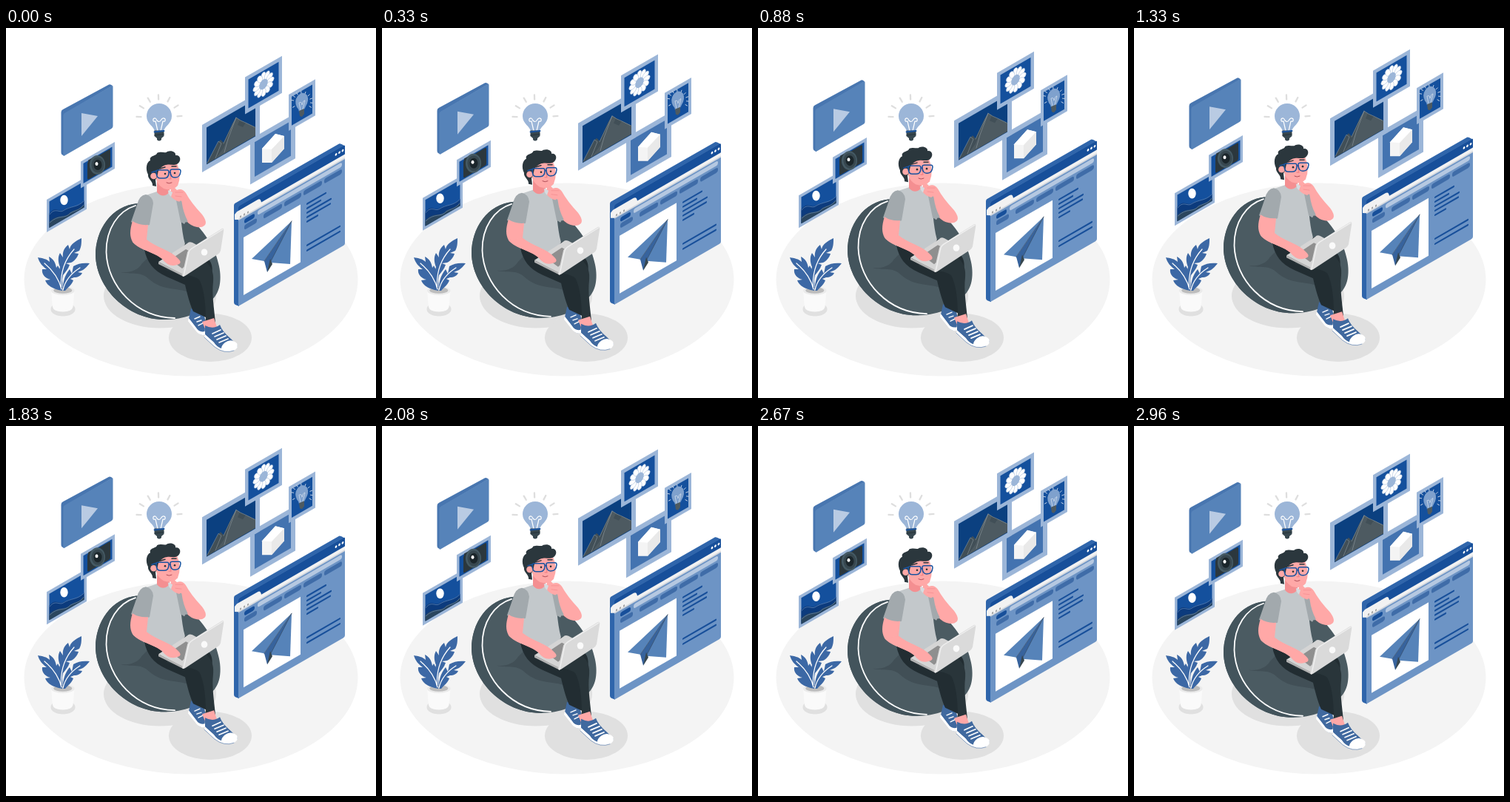
Animation of 500x500 px, one loop 3 s. Source, as an HTML page:

```html
<!DOCTYPE html>
<html lang="en">
<head>
<meta charset="utf-8">
<title>Floating workspace</title>
<style>
html, body { margin: 0; width: 100%; height: 100%; overflow: hidden; background: #fff; }
svg { display: block; width: 100vw; height: 100vh; }
</style>
</head>
<body>
<svg viewBox="0 0 500 500" fill="none" stroke-linecap="round" stroke-linejoin="round">
  <ellipse cx="250" cy="340" rx="225.500" ry="130.500" fill="#f4f4f4"/>
  <g fill="#e0e0e0">
    <ellipse cx="208" cy="362" rx="76" ry="43.500"/>
    <ellipse cx="276" cy="418.500" rx="56" ry="32.500"/>
    <ellipse cx="77" cy="380" rx="16.500" ry="9.500"/>
  </g>

  <g id="plant">
    <path d="M61 355L63 377Q64 383 77 383.500Q89 383 90.500 377L92.500 355Z" fill="#fafafa"/>
    <ellipse cx="76.800" cy="355" rx="15.800" ry="6" fill="#ebebeb"/>
    <ellipse cx="76.800" cy="354.500" rx="12.500" ry="4.300" fill="#bdbdbd"/>
    <g fill="#3c68a5">
      <path d="M74 350C71 342 70 332 73 323C70 316 70 309 73 304L77 310C76 302 79 297 84 293L86 299C87 292 94 288 102 284C102 290 102 296 99 301L92 304L98 305C96 311 92 315 88 317L81 318L86 320C84 326 80 330 77 334Z"/>
      <path d="M71 354C64 352 56 349 53 341L60 340C52 338 48 332 49 326L55 326C49 322 45 317 43 310C49 311 55 312 59 316L58 309C64 312 67 317 68 324L70 321C75 329 77 342 76 355Z"/>
      <path d="M77 355C76 346 79 334 86 326L89 332L91 322C97 318 105 317 113 318C110 322 107 325 104 327L97 330L103 331C101 335 97 337 92 337L87 339L91 341C89 347 84 350 80 355Z"/>
    </g>
    <path d="M74.500 350Q73 320 92 299M75 353Q70 333 52 318M77 354Q81 336 100 324" stroke="#fff" stroke-width="1.200"/>
  </g>

  <g id="idea">
    <g id="rays" stroke="#dedede" stroke-width="2.300"/>
    <path d="M201 140C200 132 190 130 190 119A17 17 0 0 1 224 119C224 130 214 132 213 140Z" fill="#9cb6d8"/>
    <path d="M205 139L202 126Q198 127 199 123Q202 120 204 125Q207 128 209 125Q212 120 215 123Q216 127 212 126L209 139" stroke="#fff" stroke-width="1.200"/>
    <path d="M200.500 138.500H213.500V146L210 149V151Q207 154 204 151V149L200.500 146Z" fill="#37474f"/>
    <path d="M200.500 140.500L213.500 139" stroke="#1a54a0" stroke-width="1.800"/>
    <path d="M201 145L213 143.500" stroke="#263238"/>
  </g>

  <g id="float">
    <g id="panels"></g>
    <g id="chair">
      <path d="M178 237C142 240 121 273 121 307C122 352 165 396 218 394C247 393 266 382 274 370C291 361 292 336 287 318C282 294 262 266 240 250Q215 238 178 237Z" fill="#4b5b62"/>
      <path d="M178 237C142 240 121 273 121 307C122 352 165 396 218 394C172 384 136 345 135 303C134 270 153 246 178 237Z" fill="#43545c"/>
      <path d="M175 240C152 247 135 271 135.500 303C137 349 176 391 228 392" stroke="#fff" stroke-width="1.800"/>
      <path d="M155 330C173 334 182 328 194 340C211 355 233 351 247 357L243 340L196 306L184 318C179 327 168 331 155 330Z" fill="#414f56"/>
    </g>

    <g id="person">
      <g id="backShoe">
        <path d="M250 379L266 381L270 398L268 414Q260 417 257 406L247 393Z" fill="#40699f"/>
        <path d="M247 392L246 396L258 411Q264 417 270 414L269 410Q261 412 257 405Z" fill="#fff"/>
        <path d="M255 393L262 390M258 397L264 395M260 402L266 399" stroke="#fff" stroke-width="1.400"/>
      </g>
      <path d="M187 299C190 316 199 328 217 336L242 347C245 360 249 375 253 383L270 391L278 334C281 318 275 310 262 306L235 286Z" fill="#222d32"/>
      <path d="M217 327C238 334 255 334 261 340C267 350 270 372 270 392L268 402L283 398C281 377 278 360 280 343C282 325 272 315 260 310L235 301Z" fill="#29353a"/>
      <path d="M265 397L281 392L286 407L270 409Z" fill="#ffa8a7"/>
      <g id="frontShoe">
        <path d="M269 402Q280 408 289 401Q292 410 304 420L313 429Q311 437 297 436Q286 434 280 424L269 415Z" fill="#40699f"/>
        <path d="M269 414L268 418L282 431Q295 441 308 436Q315 432 312 426Q304 419 296 425Q291 429 291 433Q285 431 281 425Z" fill="#fff"/>
        <path d="M279 413L290 408M282 417L294 412M285 421L297 416M288 425L300 420" stroke="#fff" stroke-width="1.700"/>
        <path d="M268 418L282 431Q295 441 308 436" stroke="#40699f" stroke-width=".6"/>
      </g>

      <path d="M189 226L204 221Q213 230 221 222L232 230C237 247 236 271 242 292Q234 305 220 305Q201 305 185 299C192 279 186 249 189 226Z" fill="#c3c8cb"/>
      <path d="M229 228L238 236L248 254L241 265L236 262Z" fill="#a2a9ad"/>
      <path d="M204 207L204 222Q212 231 221 222L221 213Z" fill="#f48f91"/>
      <path d="M189 225Q180 226 177 239L169 262Q181 270 194 266L199 237Q198 227 189 225Z" fill="#a2a9ad"/>
      <path d="M171 261C167 273 167 282 171 289C180 300 201 303 211 312Q221 324 230 320Q238 319 233 313C223 300 203 297 190 286L192 266Q180 267 171 261Z" fill="#ffa8a7"/>

      <g id="head">
        <path d="M203 185Q216 177 231 183Q238 198 232 213Q225 221 213 217Q205 212 203 205Z" fill="#ffa8a7"/>
        <path d="M198 213C199 207 191 204 192 198C188 190 190 181 195 179C193 172 204 173 204 169C211 166 215 170 218 167C224 165 230 168 229 172C236 171 238 180 231 184C225 187 218 181 209 189C204 192 206 201 202 205L203 214Z" fill="#2b373d"/>
        <circle cx="199.500" cy="200" r="4.300" fill="#ffa8a7"/>
        <path d="M208 190L215 188M224 187L230 187" stroke="#2b373d" stroke-width="1.500"/>
        <g fill="#263238"><circle cx="215" cy="197" r="1.300"/><circle cx="228" cy="196" r="1.300"/></g>
        <path d="M221 194L223 204L220 204" stroke="#f07f83" stroke-width="1.100"/>
        <path d="M217 209Q220 211 224 209" stroke="#b04e58" stroke-width="1"/>
        <path d="M203 194Q203 192 206 192L218 192Q220 192 220 195Q220 203 214 203L208 203Q203 203 203 194M222 193Q222 191 225 191L234 191Q236 191 236 194Q235 202 229 202Q222 203 222 193M220 195L222 195M197 195L203 193" stroke="#1a54a0" stroke-width="1.500"/>
      </g>
      <path d="M223 219Q220 224 224 229Q229 234 236 235Q238 250 243 260Q250 268 258 269Q265 270 268 267Q273 263 265 252Q250 236 243 223Q238 216 231 219L226 214Q221 214 223 219Z" fill="#ffa8a7"/>
      <path d="M236 235Q238 250 244 261" stroke="#a2a9ad" stroke-width="3"/>
      <path d="M219 219L225 222L223 228Q219 225 219 219Z" fill="#d6dce0"/>
      <path d="M229 222L239 222M229 227L237 228" stroke="#f48f91" stroke-width=".8"/>

      <g id="laptop">
        <path d="M206 316L245 291Q247 288 252 290L276 303L240 334Z" fill="#d5d5d5"/>
        <path d="M206 316L240 333V336L206 319Z" fill="#b3b3b3"/>
        <path d="M222 313L243 299L259 307L238 325Z" fill="#8f8f8f"/>
        <path d="M171 289C180 300 201 303 211 312Q220 324 231 320Q239 318 233 312C223 300 203 297 190 286Z" fill="#ffa8a7"/>
        <path d="M238 334L245 303Q246 300 249 298L292 271Q295 270 294 275L290 301Q289 304 286 306L242 335Q238 337 238 334Z" fill="#dadada"/>
        <path d="M240 335L247 303Q248 300 251 298L293 272" stroke="#f0f0f0" stroke-width="1.300"/>
        <ellipse cx="268" cy="303" rx="4.300" ry="4.600" fill="#fafafa"/>
      </g>
    </g>
  </g>
</svg>

<script>
const LOOP = 3000, LIFT = 10, SLOPE = -0.577;
const byId = id => document.getElementById(id);
const rect = (x, y, w, h, fill, r = 0) =>
  `<rect x="${x}" y="${y}" width="${w}" height="${h}" rx="${r}" fill="${fill}"/>`;
const shape = (d, fill) => `<path d="${d}" fill="${fill}"/>`;
const oval = (x, y, rx, ry, fill) =>
  `<ellipse cx="${x}" cy="${y}" rx="${rx}" ry="${ry}" fill="${fill}"/>`;
const line = (d, color, width = 1) =>
  `<path d="${d}" stroke="${color}" stroke-width="${width}"/>`;

// Places flat content on the isometric wall; (x, y) is its upper left corner.
const wall = (x, y, content) =>
  `<g transform="matrix(1 ${SLOPE} 0 1 ${x} ${y})">${content}</g>`;
const framed = (x, y, w, h, b, fill, content = '') =>
  wall(x, y, rect(0, 0, w, h, '#9cb6d8') + rect(b, b + 1, w - 2 * b, h - 2 * b - 2, fill) + content);

const spokes = (cx, cy, from, to, angles) => angles.map(deg => {
  const a = deg * Math.PI / 180, c = Math.cos(a), s = Math.sin(a);
  return `M${cx + from * c} ${cy + from * s}L${cx + to * c} ${cy + to * s}`;
}).join('');

function playPanel() {
  return shape('M74.500 114Q74.500 111 77 110L139 76.500Q141 75.500 144 78L79 116V173L75.500 171Q74.500 170 74.500 168Z', '#4876b0') +
    wall(77.5, 116, rect(0, 0, 67, 57.5, '#5683b9', 2)) +
    shape('M102 115L124 119L102 146Z', '#b9cbe3');
}

function cameraPanel() {
  return framed(101, 180.5, 46, 36, 3.5, '#14509d',
      rect(9, 6, 31, 24, '#2b373d', 2) + rect(10, 4, 8, 4, '#2b373d')) +
    oval(123.5, 185, 10.5, 13, '#455a64') + oval(124, 185, 8.5, 10.5, '#37474f') +
    oval(124, 185, 5.5, 7, '#1b262b') + oval(122.5, 183.5, 2, 2.5, '#fff');
}

function nightPanel() {
  return framed(55, 232, 54, 44, 3.5, '#14509d') + oval(78.5, 232.5, 5.2, 6.8, '#fff') +
    shape('M58.500 251C66 240 72 249 77 246C88 240 96 243 105.500 233V242.500L58.500 270Z', '#0c3b7d') +
    shape('M58.500 262C72 250 79 258 87 249C94 245 99 246 105.500 238V242.500L58.500 270Z', '#2b465e') +
    line('M59 252C66 242 72 250 77 247C88 240 96 243 105 234M59 263C72 251 79 259 87 250C94 246 99 247 105 239', '#7397c4', .6);
}

function mountainPanel() {
  return framed(265, 131, 78, 64, 6, '#0b4080') +
    shape('M271 184L286 155L290 151L294 155L306 129L311 121L316 124L324 128L337 134V145.500Z', '#414f57') +
    shape('M284 176L294 162L311 121L316 124L313 131L320 134L324 128L337 134V145.500Z', '#4d5a61') +
    line('M272 182L287 153L291 156L283 176M294 156L311 121L300 150L295 168M311 121L317 125L324 128L336 134', '#9aa4aa', .5);
}

function flowerPanel() {
  let petals = '';
  for (let i = 0; i < 12; i++) {
    petals += `<g transform="rotate(${i * 30})">${oval(0, -11, 3.7, 5.4, '#fff')}</g>`;
  }
  return framed(323, 66.5, 50, 50, 4.5, '#14509d') +
    `<g transform="matrix(.87 -.5 0 1 348 76)"><g stroke="#9cb6d8" stroke-width=".5">${petals}</g>${oval(0, 0, 6.5, 6.5, '#9cb6d8')}</g>`;
}

function lampPanel() {
  const angles = [-170, -145, -120, -95, -70, -45, -20, 5, 30, 150];
  return framed(382, 90, 36, 49, 4, '#14509d') +
    line(spokes(400, 100, 11.5, 14.5, angles), '#c5d3e7', 1) +
    shape('M396 113Q396 110 393 107Q389 99 394 92Q401 84 407 91Q410 98 405 106L403 110Z', '#7fa1cd') +
    line('M398 111L396 101Q400 99 400 104Q402 97 404 98L401 110', '#dce5f1', .7) +
    shape('M396 112L403 109V116L400 120L397 119Z', '#4d5a61');
}

function cubePanel() {
  return framed(330, 150.5, 61, 61, 6, '#4373b0') +
    shape('M346 163L364 143L376 146V163L359 182L346 182Z', '#f4f4f4') +
    shape('M346 163L364 143L376 146L359 164Z', '#fff') +
    shape('M359 164L376 146V163L359 182Z', '#e9e9e9');
}

function browser() {
  const mid = '#3f6ca8', deep = '#174f9a';
  const menu = [[8, 17], [34, 25], [62, 23], [88, 25], [116, 24]]
    .map(([x, w]) => rect(x, 30, w, 6.5, mid, 2.5)).join('');
  const text = [[49, 27], [55, 20], [61, 34], [67, 33], [73, 16], [105, 46], [112, 46]]
    .map(([y, w]) => rect(92, y, w, 2.4, deep, 1)).join('');
  const dots = [132, 136.5, 141].map(x => oval(x, 6, 1.4, 1.6, '#fff')).join('');
  const buttons = [3, 8, 13].map(x => oval(x, 15.5, 1.1, 1.3, '#9e9e9e')).join('');
  return shape('M308 240Q308 237 311 236L450 156.500Q452 155.500 457 159L315 243V376L310 374Q308 373 308 371Z', '#2f65ab') +
    wall(314, 241,
      rect(0, 0, 144, 135, '#6d94c5', 2) + rect(0, 0, 144, 14, deep, 2) +
      shape('M-5 8L-2 6H26Q30 6 31 12.500H144V18H0L-5 15Z', '#f2f2f2') +
      rect(0, 17, 144, 2, '#d5d9df') + dots + buttons +
      rect(8, 22, 14, 6, deep, 2.5) + rect(26, 21, 114, 6, '#b5c8e1', 2.5) +
      menu + rect(7, 46, 77, 78, '#fff') + text) +
    shape('M386 261L332 312L349 315Z', '#5683b9') +
    shape('M386 261L349 315L353 330L359 318Z', '#37639d') +
    shape('M386 261L357 317L384 319Z', '#5683b9') +
    shape('M357 312L353 330L360 319Z', '#37474f') +
    line('M386 261L349 315M386 261L357 317', '#34475b', .6);
}

byId('rays').innerHTML = `<path d="${spokes(207, 121, 24.5, 30.5, [-178, -149, -120, -92, -62, -33, -4])}"/>`;
byId('panels').innerHTML = playPanel() + nightPanel() + cameraPanel() + cubePanel() +
  mountainPanel() + flowerPanel() + lampPanel() + browser();

const floating = byId('float');
function draw(now) {
  const phase = now % LOOP / LOOP;
  const rise = LIFT * (1 - Math.abs(2 * phase - 1));
  floating.setAttribute('transform', `translate(0 ${-rise})`);
  requestAnimationFrame(draw);
}
draw(performance.now());
</script>
</body>
</html>
```
